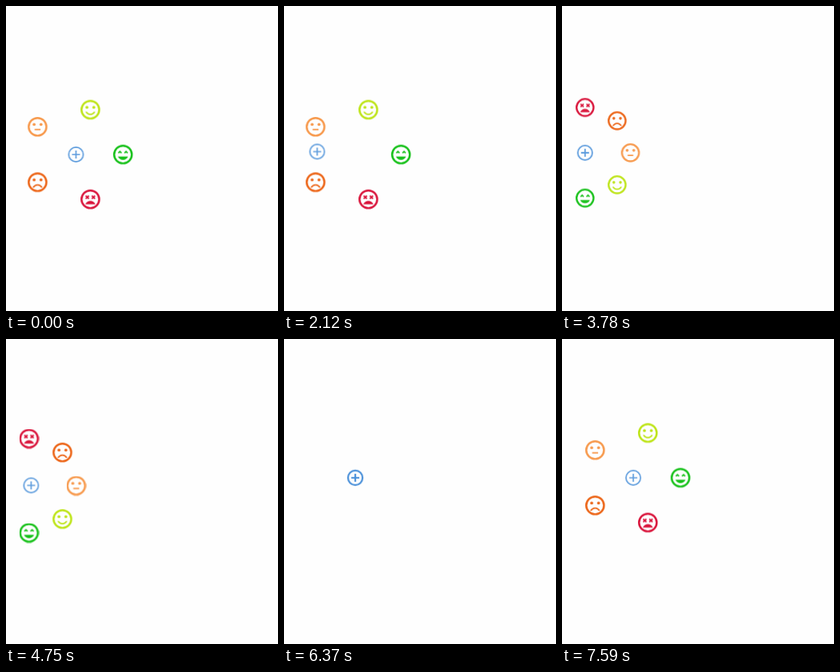
Write an HTML page that moves like this. It is 340 px wide and 382 px high and loops after 9.65 s.

```html
<!DOCTYPE html>
<html lang="en">
<head>
<meta charset="utf-8">
<title>Radial mood menu</title>
<style>
  html, body { margin: 0; width: 100%; height: 100%; overflow: hidden; background: #fefefe; }
  svg { display: block; }
  .face, .plus { animation: 9650ms linear infinite; }
  .face { animation-name: menu; }
  .plus { animation-name: drag, press; animation-duration: 9650ms, 9650ms;
          animation-timing-function: linear, linear; animation-iteration-count: infinite, infinite; }
  .ring { fill: none; stroke: currentColor; stroke-width: 2; }
  .face path, .face .eye { fill: currentColor; }
  .plus { color: #4a90d9; }
  .plus * { fill: none; stroke: currentColor; }

  /* Open at a, close into the button, open at b, close, open at c */
  @keyframes menu {
    0%     { transform: translate(var(--a)) scale(1); opacity: 1; }
    25.08% { transform: translate(var(--a)) scale(1); opacity: 1; animation-timing-function: ease-in; }
    30.47% { transform: translate(28.8px, 183.8px) scale(0); opacity: 0; }
    34.97% { transform: translate(28.8px, 183.8px) scale(0); opacity: 0; animation-timing-function: ease-out; }
    39.95% { transform: translate(var(--b)) scale(1); opacity: 1; }
    59.53% { transform: translate(var(--b)) scale(1); opacity: 1; animation-timing-function: ease-in; }
    64.92% { transform: translate(89.1px, 173.8px) scale(0); opacity: 0; }
    69.33% { transform: translate(89.1px, 173.8px) scale(0); opacity: 0; animation-timing-function: ease-out; }
    74.3%  { transform: translate(var(--c)) scale(1); opacity: 1; }
    100%   { transform: translate(var(--c)) scale(1); opacity: 1; }
  }
  @keyframes drag {
    0%, 14.72%      { transform: translate(87.5px, 186px); }
    21.97%          { transform: translate(41.5px, 182.4px); }
    24.04%, 48.81%  { transform: translate(28.8px, 183.8px); }
    58.45%, 59.53%  { transform: translate(87.6px, 174px); }
    62%, 100%       { transform: translate(89.1px, 173.8px); }
  }
  @keyframes press {
    0%, 25.08%      { stroke-width: 1.7px; opacity: .88; }
    30.47%, 34.97%  { stroke-width: 2.2px; opacity: 1; }
    39.95%, 59.53%  { stroke-width: 1.7px; opacity: .88; }
    64.92%, 69.33%  { stroke-width: 2.2px; opacity: 1; }
    74.3%, 100%     { stroke-width: 1.7px; opacity: .88; }
  }
</style>
</head>
<body>
<svg id="stage" width="340" height="382" viewBox="0 0 340 382">
  <g class="plus">
    <circle r="9.1"/>
    <path d="M-5 0H5M0-5V5"/>
  </g>
</svg>
<script>
  const RADIUS = 59;
  const dots = '<circle class="eye" cx="8.5" cy="9.5" r="1.5"/><circle class="eye" cx="15.5" cy="9.5" r="1.5"/>';
  const pair = (d) => `<path d="${d}"/><path transform="translate(6.24)" d="${d}"/>`;
  const arches = pair('M8.88 9.94 9.94 11 11 9.94 8.88 7.82 6.76 9.94 7.82 11z');
  const crosses = pair('M7.82 12l1.06-1.06L9.94 12 11 10.94 9.94 9.88 11 8.82 9.94 7.76 8.88 8.82 7.82 7.76 6.76 8.82l1.06 1.06-1.06 1.06z');

  const faces = [
    { color: '#17c11a', eyes: arches, mouth: 'M6.88 14c.8 2.04 2.79 3.5 5.12 3.5s4.32-1.46 5.12-3.5z' },
    { color: '#bde416', eyes: dots, mouth: 'M12 16c-1.48 0-2.75-.81-3.45-2H6.88c.8 2.05 2.79 3.5 5.12 3.5s4.32-1.45 5.12-3.5h-1.67c-.7 1.19-1.97 2-3.45 2z' },
    { color: '#f7994c', eyes: dots, mouth: 'M9 14h6v1.5H9z' },
    { color: '#ec6416', eyes: dots, mouth: 'M12 14c-2.33 0-4.32 1.45-5.12 3.5h1.67c.69-1.19 1.97-2 3.45-2s2.75.81 3.45 2h1.67c-.8-2.05-2.79-3.5-5.12-3.5z' },
    { color: '#d9133a', eyes: crosses, mouth: 'M12 13.5c-2.33 0-4.32 1.46-5.12 3.5h10.24c-.8-2.04-2.79-3.5-5.12-3.5z' }
  ];

  const around = (cx, cy, deg) => {
    const a = deg * Math.PI / 180;
    return `${(cx + RADIUS * Math.cos(a)).toFixed(2)}px, ${(cy + RADIUS * Math.sin(a)).toFixed(2)}px`;
  };

  document.getElementById('stage').insertAdjacentHTML('beforeend', faces.map((face, i) => {
    const a = around(87.2, 186, -72 * i);
    const b = around(28.8, 183.8, 90 - 45 * i);
    const c = around(89.1, 173.8, -72 * i);
    return `<g class="face" style="color:${face.color};--a:${a};--b:${b};--c:${c}">
      <g transform="scale(1.23) translate(-12 -12)">
        <circle class="ring" cx="12" cy="12" r="9"/>${face.eyes}<path d="${face.mouth}"/>
      </g></g>`;
  }).join(''));
</script>
</body>
</html>
```
